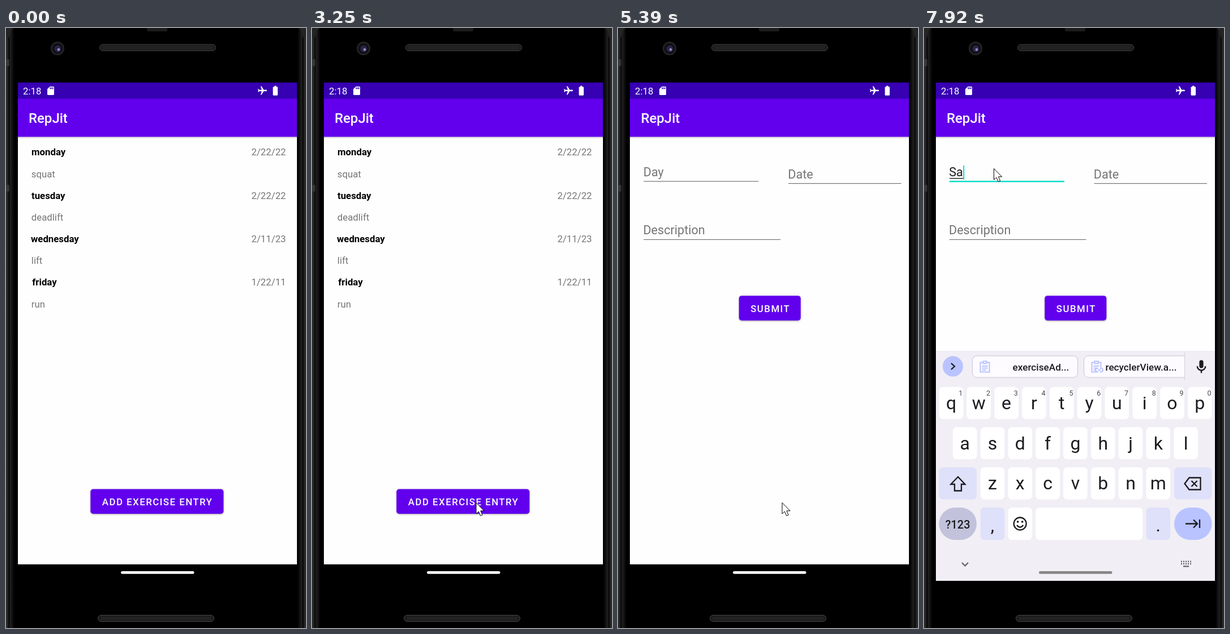
Recreate the animation shown at these times as an HTML page. Size 530 px wide and 1056 px high, loop 7990 ms.

```html
<!DOCTYPE html>
<html lang="en">
<head>
<meta charset="utf-8">
<title>Exercise log</title>
<style>
  html, body { margin: 0; width: 100%; height: 100%; overflow: hidden; background: #000; }
  svg { display: block; font: 16.8px Roboto, sans-serif; }
  .title { font-size: 24px; font-weight: 500; fill: #fff; }
  .day { font-weight: 700; }
  .soft { fill: #757575; }
  .end { text-anchor: end; }
  .btn { fill: #6200ee; filter: drop-shadow(0 1.5px 1.5px rgba(0,0,0,.35)); }
  .label { font-weight: 500; letter-spacing: 1.5px; fill: #fff; }
  .field { font-size: 21.6px; }
  .key { font-size: 32px; text-anchor: middle; fill: #1b1b1f; }
  .sup { font-size: 12.5px; text-anchor: middle; fill: #46464f; }
  .chip { font-size: 17.2px; font-weight: 500; fill: #1b1b1f; }
  .line { fill: none; stroke: #1b1b1f; stroke-width: 2.3; }
  .pale { fill: none; stroke: #b9c3ff; stroke-width: 2; }
</style>
</head>
<body>
<svg width="530" height="1056" viewBox="0 0 530 1056">
  <defs>
    <linearGradient id="edge">
      <stop offset="0" stop-color="#303030"/><stop offset=".28" stop-color="#1c1c1c"/>
      <stop offset=".34" stop-color="#000"/><stop offset=".5" stop-color="#202020"/>
      <stop offset="1" stop-color="#000"/>
    </linearGradient>
    <linearGradient id="shade" x2="0" y2="1">
      <stop offset="0" stop-opacity=".22"/><stop offset="1" stop-opacity="0"/>
    </linearGradient>
    <clipPath id="app"><rect x="21" y="96" width="493" height="848"/></clipPath>
    <clipPath id="glass"><rect x="21" y="96" width="493" height="877"/></clipPath>
    <clipPath id="strip"><rect x="80" y="570" width="380.5" height="50"/></clipPath>
  </defs>

  <rect width="530" height="1056"/>
  <g id="body"></g>

  <g clip-path="url(#app)">
    <g id="list"></g>
    <g id="form"></g>
  </g>

  <path fill="#3700b3" d="M21 96h493v28.500h-493z"/>
  <g fill="#fff">
    <text x="30" y="117">2:18</text>
    <path transform="translate(70 101.500) scale(.75)" d="M18 2h-8L4 8v12c0 1.100.9 2 2 2h12c1.100 0 2-.9 2-2V4c0-1.100-.9-2-2-2zm-6 6h-2V4h2zm3 0h-2V4h2zm3 0h-2V4h2z"/>
    <path transform="translate(453 110) rotate(90) scale(.8) translate(-11.500 -12)" d="M21 16v-2l-8-5V3.500a1.500 1.500 0 0 0-3 0V9l-8 5v2l8-2.500V19l-2 1.500V22l3.500-1 3.500 1v-1.500L13 19v-5.500z"/>
    <path transform="translate(465.600 100) scale(.85)" d="M15.700 4H14V2h-4v2H8.300Q7 4 7 5.300v15.400Q7 22 8.300 22h7.400q1.300 0 1.300-1.300V5.300Q17 4 15.700 4z"/>
  </g>

  <g clip-path="url(#glass)"><g id="board"></g></g>
  <rect id="pill" x="203" y="956" width="129.500" height="4.800" rx="2.400"/>

  <circle id="halo" r="16" fill="#fff000" fill-opacity=".5"/>
  <path id="mouse" stroke="#000" stroke-linejoin="round" d="M.5.5V20l4.400-4 3.300 7.500 3.400-1.500-3.200-7.200h6.200z"/>
</svg>

<script>
const $ = id => document.getElementById(id);
const LOOP = 7990;
const rect = (x, y, w, h, r, attrs) => `<rect x="${x}" y="${y}" width="${w}" height="${h}" rx="${r}" ${attrs}/>`;
const text = (x, y, cls, s, id = '') => `<text x="${x}" y="${y}" class="${cls}" id="${id}">${s}</text>`;
const path = (cls, d) => `<path class="${cls}" d="${d}"/>`;

// Phone body
const speaker = (x, y) =>
  rect(x, y, 205, 11, 5.5, 'fill="#1a1a1a" stroke="#484848"') +
  [3.5, 5.5, 7.5].map(d => `<path d="M${x + 5} ${y + d}h195" stroke="#3c3c3c" stroke-dasharray="1 1"/>`).join('');
const side = rect(0, 0, 15, 1056, 0, 'fill="url(#edge)"') +
  `<path d="M0 0h13q-6 4-7 16l-6 2z" fill="#242424"/>`;
$('body').innerHTML = side + `<g transform="translate(530) scale(-1 1)">${side}</g>` +
  [55, 276].map(y => rect(0, y, 5.5, 12, 1, 'fill="#383838"')).join('') +
  rect(249, -5, 36, 11, 3, 'fill="#1c1c1c"') +
  speaker(165.5, 29) + speaker(162.5, 1033.5) +
  [[91, 36, 12, '#252525'], [91, 36, 9.5, '#0f0e16'], [91.5, 36.5, 6, '#2b2344'], [93, 38, 2.4, '#9585bd']]
    .map(([x, y, r, c]) => `<circle cx="${x}" cy="${y}" r="${r}" fill="${c}"/>`).join('');

// App screens
const page = rect(-60, 191, 660, 760, 0, 'fill="#fefefe"') +
  rect(-60, 191, 660, 4, 0, 'fill="url(#shade)"') +
  rect(-60, 124, 660, 67.5, 0, 'fill="#6200ee"') + text(40, 167, 'title', 'RepJit');
const button = (x, y, w, s) => rect(x, y, w, 43.5, 4.8, 'class="btn"') + text(x + 20.5, y + 28.3, 'label', s);

$('list').innerHTML = page + [
  ['monday', 'squat', '2/22/22', 45], ['tuesday', 'deadlift', '2/22/22', 45],
  ['wednesday', 'lift', '2/11/23', 44], ['friday', 'run', '1/22/11', 46.3]
].map(([day, work, date, x], i) => {
  const y = 224.2 + i * 76.3;
  return text(x, y, 'day', day) + text(494.5, y, 'soft end', date) + text(44.8, y + 38.5, 'soft', work);
}).join('') + button(149.3, 811.5, 235, 'ADD EXERCISE ENTRY');

const rule = (x, y, w) => rect(x, y, w, 1.2, 0, 'fill="#757575"');
$('form').innerHTML = page + text(44.3, 261, 'field', '', 'entry') +
  text(299.8, 265, 'field soft', 'Date') + text(44, 363, 'field soft', 'Description') +
  rule(300.5, 273, 199.5) + rule(44.8, 371.8, 241.7) +
  rect(44.8, 269.3, 203, 1.2, 0, 'id="rule"') +
  rect(45, 264, 0, 1.2, 0, 'id="typed"') +
  rect(45, 242, 1.9, 25, 0, 'id="caret" fill="#03dac5"') +
  button(213.3, 471.2, 109, 'SUBMIT');

// Keyboard
const GAP = 48.8, WHITE = 'fill="#fff"', TINT = 'fill="#dfe0fa"', BLUE = 'fill="#b9c3ff"';
const keyRow = (letters, x, y) => [...letters].map((c, i) =>
  rect(x + i * GAP - 21.3, y, 42.6, 56.5, 7, WHITE) + text(x + i * GAP, y + 39, 'key', c)).join('');
const clip = x => path('pale', `M${x} 588.500h-5v17h16v-17h-5M${x} 586.500h6v4h-6zM${x - 2} 595h10m-10 3.500h10m-10 3.500h7`);
const chip = (x, w, tx, s) => rect(x, 577, w, 38, 8, 'fill="#fdfbff" stroke="#c7c5d0"') +
  clip(x + 19) + text(tx, 602.5, 'chip', s);

$('board').innerHTML = rect(21, 568, 493, 405, 0, 'fill="#f1eff5"') +
  `<circle cx="51" cy="595.500" r="18" ${BLUE}/>` + path('line', 'm48 590 6 5.500-6 5.500') +
  `<g clip-path="url(#strip)"><g id="chipA">${chip(85.5, 186, 156.5, 'exerciseAd...')}</g>
   <g id="chipB">${chip(282.5, 195, 320.5, 'recyclerView.a...')}
   <circle cx="309" cy="602" r="5.500" fill="#fdfbff"/>${path('pale', 'M308 599h-2a3 3 0 0 0 0 6h2m3-6h2a3 3 0 0 1 0 6h-2m-4-3h5')}</g></g>` +
  rect(460, 571, 1, 48, 0, 'fill="#d3d1d9"') +
  `<path transform="translate(475.600 582) scale(1.200)" fill="#1b1b1f" d="M12 14c1.660 0 3-1.340 3-3V5a3 3 0 0 0-6 0v6c0 1.660 1.340 3 3 3zm5-3a5 5 0 0 1-10 0H5c0 3.530 2.610 6.430 6 6.920V21h2v-3.080c3.390-.49 6-3.390 6-6.920z"/>` +
  keyRow('qwertyuiop', 48, 631.8) + keyRow('asdfghjkl', 72.2, 702.5) + keyRow('zxcvbnm', 121, 773.2) +
  [...'1234567890'].map((c, i) => text(64.7 + i * GAP, 646.7, 'sup', c)).join('') +
  rect(26.5, 773.2, 66.5, 56.5, 7, TINT) + path('line', 'm60 790-12.500 13h6.500v11.500h12v-11.500h6.500z') +
  rect(442, 773.2, 66.5, 56.5, 7, TINT) + path('line', 'M468.500 791.500h20v21h-20l-8-10.500zm4 5.500 10 10m0-10-10 10') +
  rect(26.5, 844, 66.5, 57, 28.5, 'fill="#c2c2dc"') +
  `<text x="59.700" y="880.500" font-size="20" font-weight="500" text-anchor="middle" fill="#1b1b1f">?123</text>` +
  rect(99.7, 844, 42.6, 57, 7, TINT) + text(121, 886, 'key', ',') +
  rect(148.5, 844, 42.6, 57, 7, WHITE) +
  `<circle cx="169.700" cy="872.500" r="11" class="line"/><circle cx="165.700" cy="869" r="1.800"/><circle cx="173.700" cy="869" r="1.800"/>` +
  path('line', 'M164 875q5.700 7 11.400 0') +
  rect(197.3, 844, 189, 57, 7, WHITE) +
  rect(392.5, 844, 42.6, 57, 7, TINT) + text(413.8, 886, 'key', '.') +
  rect(442, 844, 66.5, 57, 28.5, BLUE) + path('line', 'M462 872.500h21m-7-7 7 7-7 7M487 865v15') +
  `<g opacity=".65">${path('line', 'm67 941 5.500 5.500 5.500-5.500')}` +
  [939, 943].map(y => `<path class="line" stroke-dasharray="2 2" d="M454 ${y}h18"/>`).join('') +
  path('line', 'M458 947.500h10') + '</g>';

// Each key is [time, values...]; values are linear in between and held outside.
function track(t, keys) {
  const i = keys.findIndex(k => k[0] > t);
  if (i < 1) return keys.at(i).slice(1);
  const a = keys[i - 1], b = keys[i], p = (t - a[0]) / (b[0] - a[0]);
  return a.slice(1).map((v, j) => v + (b[j + 1] - v) * p);
}
const MOUSE = [
  [100, 405, 914], [300, 194, 587], [840, 194, 587], [1130, 184, 520], [1390, 164, 438],
  [1540, 125, 385], [1670, 141, 325], [1810, 222, 313], [2145, 222, 313], [2350, 265, 271],
  [2620, 399, 430], [2970, 359, 745], [3250, 289.5, 835], [5520, 289.5, 835],
  [5800, 235, 690], [6100, 150, 330], [6280, 123, 247]
];
const SLIDE = [
  [5050, 0], [5088, .08], [5125, .4], [5145, .72], [5185, .88], [5275, .955], [5390, .991], [5500, 1]
];
const BOARD = [[6540, 405, 0], [6610, 228, .32], [6680, 55, .85], [6750, 8, 1], [6820, 0, 1]];
const within = (t, a, b) => t >= a && t < b;
const set = (id, attrs) => { for (const k in attrs) $(id).setAttribute(k, attrs[k]); };
const grow = (x, s) => `translate(${x} 596) scale(${s}) translate(${-x} -596)`;

function draw(t) {
  const [x, y] = track(t, MOUSE);
  const click = within(t, 4780, 4925) || within(t, 6330, 6475);
  set('mouse', { transform: `translate(${x} ${y})`, opacity: +(t >= 100), fill: click ? '#ffff8c' : '#fff' });
  set('halo', { cx: x, cy: y, opacity: +click });

  const [slide] = track(t, SLIDE);
  const [fade] = track(t, [[5100, 0], [5183, 1]]);
  set('list', { transform: `translate(${-49 * slide})` });
  set('form', { transform: `translate(${49 * (1 - slide)})`, opacity: fade });

  const focus = t >= 6475;
  const typed = t < 7520 ? '' : t < 7860 ? 'S' : 'Sa';
  const width = [0, 12.5, 24.3][typed.length];
  $('entry').textContent = typed || 'Day';
  set('entry', { fill: typed ? '#1c1c1c' : '#757575' });
  set('typed', { width });
  set('rule', { y: focus ? 268.9 : 269.3, height: focus ? 2.4 : 1.2, fill: focus ? '#03dac5' : '#757575' });
  set('caret', { x: 45 + width, opacity: +(within(t, 6475, 6960) || t >= 7460) });

  const [drop, alpha] = track(t, BOARD);
  const [chips] = track(t, [[6540, 0], [6610, .35], [6750, 1]]);
  set('board', { transform: `translate(0 ${drop})`, opacity: alpha });
  set('chipA', { transform: grow(180, chips), opacity: chips });
  set('chipB', { transform: grow(380, chips), opacity: chips < .4 ? 0 : chips });
  const [grey] = track(t, [[6900, 255], [7040, 150], [7240, 134]]);
  set('pill', { fill: `rgb(${grey},${grey},${grey})` });
}

let start;
function tick(now) {
  start ??= now;
  draw((now - start) % LOOP);
  requestAnimationFrame(tick);
}
draw(0);
requestAnimationFrame(tick);
</script>
</body>
</html>
```
